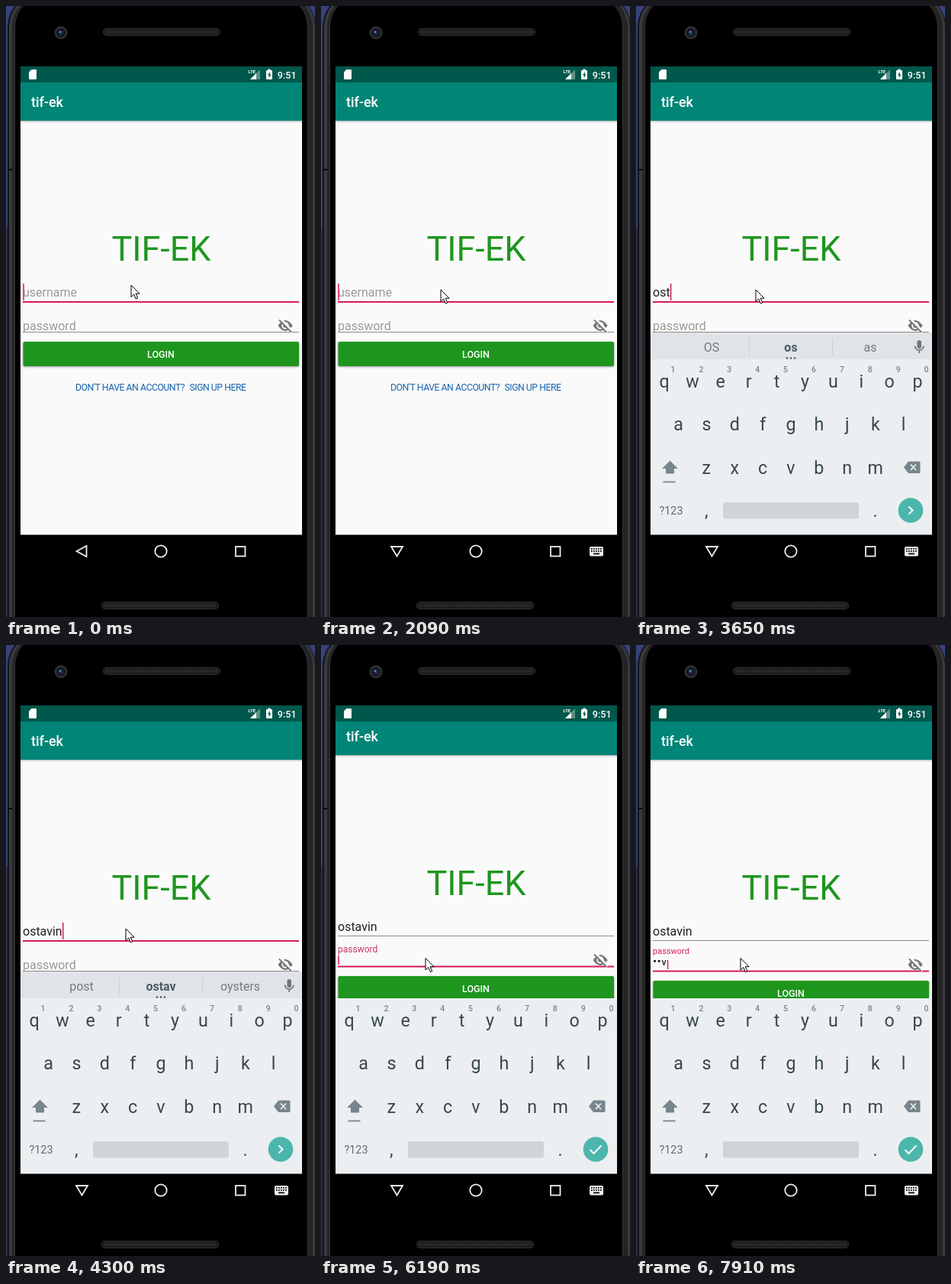
An HTML page with a canvas that plays this animation: 405 by 799 pixels, repeating every 8000 ms.

```html
<!DOCTYPE html>
<html lang="en">
<head>
<meta charset="utf-8">
<style>
html, body { margin: 0; width: 100%; height: 100%; overflow: hidden; background: #000; }
canvas { display: block; }
</style>
</head>
<body>
<canvas id="stage" width="405" height="799"></canvas>
<script>
const ctx = document.getElementById('stage').getContext('2d');
const LOOP = 8000;
const PINK = '#d81b60', GREEN = '#1e961e', GREY = '#757575', KEY = '#37474f';
const NAME = 'ostavin';

// Each track lists [time, ...values]; a value holds until the next entry.
const pointerTrack = [
  [0, 164, 364.5], [1030, 162, 366], [1150, 161, 367], [1300, 159, 368],
  [1430, 158, 369], [1550, 157, 370.5], [5160, 156, 379], [5280, 153.5, 388],
  [5430, 149, 395], [5550, 144, 402], [5820, 140, 406], [5940, 137, 409]
];
const caretTrack = [
  [0, 1], [500, 0], [1030, 1], [1550, 0], [1940, 1], [2330, 0], [2980, 1],
  [4880, 0], [5430, 1], [5940, 0], [6190, 1], [6620, 0], [6940, 1],
  [7580, 0], [7910, 1]
];
const typedTrack = [
  [0, 0], [3270, 1], [3410, 2], [3650, 3], [3800, 4], [3920, 5], [4060, 6], [4300, 7]
];
const hintTrack = [
  [0, '', 'ruvo', ''], [3410, 'so', 'o', 'on'], [3530, 'OS', 'os', 'as'],
  [3800, 'OST', 'ost', 'oysters'], [4060, 'post', 'ostav', 'oysters'],
  [4450, 'as with', NAME, 'oysters']
];
const secretTrack = [[0, ''], [6940, 'a'], [7060, '•n'], [7910, '••v']];
const panTrack = [[0, 0], [6190, 6], [6310, 1], [6470, 0]];
const floatTrack = [[0, 0], [6190, 0.8], [6310, 1]];
const slideTrack = [[0, 266], [2210, 110], [2330, 0]];

const at = (track, t) => track.filter(e => e[0] <= t).pop().slice(1);

function box(x, y, w, h, color, r = 0) {
  ctx.fillStyle = color;
  ctx.beginPath();
  ctx.roundRect(x, y, w, h, r);
  ctx.fill();
}

function disc(x, y, r, color) {
  ctx.fillStyle = color;
  ctx.beginPath();
  ctx.arc(x, y, r, 0, 7);
  ctx.fill();
}

function text(s, x, y, size, color, align = 'left', weight = 400) {
  ctx.font = `${weight} ${size}px Roboto, sans-serif`;
  ctx.textAlign = align;
  ctx.fillStyle = color;
  ctx.fillText(s, x, y);
  return ctx.measureText(s).width;
}

function shape(d, fill, stroke, width = 1) {
  const p = new Path2D(d);
  if (fill) { ctx.fillStyle = fill; ctx.fill(p); }
  if (stroke) { ctx.strokeStyle = stroke; ctx.lineWidth = width; ctx.stroke(p); }
}

function clipped(x, y, w, h, draw) {
  ctx.save();
  ctx.beginPath();
  ctx.rect(x, y, w, h);
  ctx.clip();
  draw();
  ctx.restore();
}

function speaker(x, y) {
  box(x, y, 154, 10, '#303030', 5);
  box(x + 1, y + 1, 152, 8, '#1c1c1c', 4);
  for (let i = 4; i < 150; i += 3) box(x + i, y + 3, 1.5, 4, '#303030');
}

function phone() {
  box(0, 0, 405, 290, '#35427c');
  box(0, 290, 405, 509, '#28304f');
  box(2, -18, 404, 860, '#131315', 46);
  box(4, -17, 401, 858, '#3a3a3d', 45);
  box(8, -15, 394, 854, '#242427', 43);
  box(11, -13, 385, 850, '#353538', 41);
  box(12, -13, 383, 850, '#000', 40);
  box(2, 213, 6, 2, '#08080a');
  disc(72, 35, 8.5, '#303033');
  disc(72, 35, 6, '#15161c');
  disc(72, 35, 3.5, '#19284c');
  disc(71, 34, 1.3, '#7189bd');
  speaker(127, 29);
  speaker(125, 779);
}

function statusBar() {
  box(19, 79, 369, 21, '#00574b');
  shape('M33.500 83h5.500q1 0 1 1v11q0 1-1 1h-8q-1 0-1-1v-8.500z', '#fff');
  text('LTE', 317.5, 88, 6, '#fff', 'left', 700);
  shape('M333 83V96H320z', '#5d9189');
  shape('M328 88V96H320z', '#fff');
  box(341, 84, 8, 12, '#fff', 1);
  box(343.5, 82.5, 3, 2, '#fff');
  shape('M345.800 86l-2.800 4.500h1.700v3.500l2.800-4.500h-1.700z', '#00574b');
  text('9:51', 380.5, 94.5, 12.5, '#fff', 'right', 500);
}

function navBar(open) {
  box(19, 691.5, 369, 42, '#000');
  shape(open ? 'M92 707h15l-7.500 12.500z' : 'M92.500 713l13-7v14z', null, '#eee', 1.8);
  ctx.beginPath();
  ctx.arc(203, 713, 7.7, 0, 7);
  ctx.stroke();
  ctx.strokeRect(301, 707, 12.5, 12.5);
  if (!open) return;
  box(352, 707, 18, 12.5, '#eee', 2);
  for (let i = 0; i < 5; i++)
    for (let j = 0; j < 2; j++) box(354 + i * 3, 709 + j * 3, 1.7, 1.7, '#000');
  box(357, 715.5, 8, 1.7, '#000');
}

function eye() {
  shape('M356.500 418Q366 404 375.700 418Q366 432 356.500 418z', GREY);
  disc(366, 418, 4.7, '#fafafa');
  disc(366, 418, 2.8, GREY);
  shape('M358.500 409L375.500 426', null, '#fafafa', 4);
  shape('M358 410.500L374 426.500', null, GREY, 1.8);
}

function caret(x, y, h) {
  box(x, y, 1.5, h, PINK);
}

function loginButton() {
  ctx.save();
  ctx.shadowColor = 'rgba(0, 0, 0, 0.4)';
  ctx.shadowBlur = 3;
  ctx.shadowOffsetY = 1;
  box(22.5, 439, 361.5, 32, GREEN, 2);
  ctx.restore();
  text('LOGIN', 203, 460, 12.5, '#fff', 'center', 500);
}

function page(t) {
  const inSecret = t >= 6190;
  const [on] = at(caretTrack, t);
  const [count] = at(typedTrack, t);
  const [lift] = at(floatTrack, t);
  const [secret] = at(secretTrack, t);

  box(19, 79, 369, 613, '#fafafa');
  ['#c4c4c4', '#dedede', '#efefef'].forEach((c, i) => box(19, 150 + i, 369, 1, c));
  box(19, 90, 369, 60, '#008577');
  text('tif-ek', 33, 132, 18, '#fff', 'left', 500);
  text('TIF-EK', 203.5, 332.5, 45, GREEN, 'center');

  let width = 0;
  if (count) width = text(NAME.slice(0, count), 22, 380, 16, '#212121');
  else text('username', 22, 380, 16, '#9a9a9a');
  if (t >= 4450 && !inSecret) box(22, 381, width, 1, '#212121');
  if (inSecret) box(22, 386, 362, 1, '#8b8b8b');
  else box(22, 386, 362, 2, PINK);
  if (on && !inSecret) caret(22.3 + width, 363, 22);

  if (inSecret) box(22, 425.5, 362, 2, PINK);
  else box(22, 426, 362, 1, '#8b8b8b');
  const labelColor = !lift ? '#9a9a9a' : lift < 1 ? '#c2326a' : PINK;
  text('password', 22, 424 - 20 * lift, 16 - 5 * lift, labelColor);
  clipped(22, 412, 330, 12, () => {
    const end = text(secret, 22, 419, 16, '#212121');
    if (on && inSecret) caret(22.3 + end, 412, 12);
  });
  eye();
  loginButton();

  ctx.letterSpacing = '-0.5px';
  text("DON'T HAVE AN ACCOUNT?", 91, 502.5, 12.3, '#1a66ad');
  text('SIGN UP HERE', 240.5, 502.5, 12.3, '#1a66ad');
  ctx.letterSpacing = '0px';
}

function suggestions(t) {
  box(19, 427, 369, 36, '#e0e4e8');
  const words = at(hintTrack, t);
  const bold = t >= 3410 && t < 4450;
  words.forEach((s, i) => {
    const strong = i === 1 && bold;
    text(s, 99 + i * 104, 452, 16, strong ? '#4b5a62' : '#717c83',
      'center', strong ? 700 : 400);
  });
  if (words[0]) {
    box(148, 435, 1, 22, '#cbd0d4');
    box(257, 435, 1, 22, '#cbd0d4');
    for (let i = -1; i < 2; i++) disc(203 + i * 5, 460.5, 1.3, '#4b5a62');
  }
  box(368.5, 437, 5.5, 11, '#6b767c', 2.7);
  shape('M365.500 444.500a5.700 5.700 0 0 0 11.400 0M371.200 450v4', null, '#6b767c', 1.7);
}

function keyRow(letters, x, y) {
  [...letters].forEach((c, i) => text(c, x + i * 36.9, y, 23.3, KEY, 'center'));
}

function keyboard(t) {
  const done = t >= 6190;
  if (!done) suggestions(t);
  box(19, 462, 369, 230, '#eceff1');
  keyRow('qwertyuiop', 37, 499);
  [...'1234567890'].forEach((c, i) =>
    text(c, 48.5 + i * 36.9, 479, 10.5, '#78858c', 'center', 500));
  keyRow('asdfghjkl', 55.5, 555.3);
  keyRow('zxcvbnm', 92.3, 611.7);

  shape('M44.500 594.500l10.500 10.500h-5v6.500h-11v-6.500h-5z', '#78858c');
  box(35.5, 621.5, 16, 1.8, '#78858c');
  shape('M357 595.500h14q1.500 0 1.500 1.500v12.500q0 1.500-1.500 1.500h-14l-6-7.700z', '#78858c');
  shape('M360 599.500l7 7.500m0-7.500l-7 7.500', null, '#eceff1', 1.8);

  text('?123', 46, 665, 14.3, '#5c6b73', 'center');
  text(',', 92.3, 668, 23.3, KEY, 'center');
  text('.', 313.5, 668, 23.3, KEY, 'center');
  box(114, 649, 178, 21.5, '#cfd4d7', 3);
  disc(360, 659.5, 16.3, '#4db6ac');
  shape(done ? 'M352.500 660l5 5l10-10.500' : 'M357.500 654.500l5 5l-5 5', null, '#fff', 2);
}

function pointer(t) {
  const [x, y] = at(pointerTrack, t);
  ctx.save();
  ctx.translate(x, y + 0.5);
  shape('M0 0V15.500L3.700 12L6.300 18L8.700 17L6.200 11.200H11z', '#fff', '#000', 1);
  ctx.restore();
}

function draw(t) {
  ctx.clearRect(0, 0, 405, 799);
  phone();
  clipped(19, 79, 369, 613, () => {
    const [pan] = at(panTrack, t);
    box(19, 79, 369, 613, '#fafafa');
    ctx.save();
    ctx.translate(0, -pan);
    page(t);
    ctx.restore();
    statusBar();
    ctx.translate(0, at(slideTrack, t)[0]);
    keyboard(t);
  });
  navBar(t >= 2090);
  pointer(t);
}

const start = performance.now();
function tick() {
  draw((performance.now() - start) % LOOP);
  requestAnimationFrame(tick);
}
tick();
</script>
</body>
</html>
```
